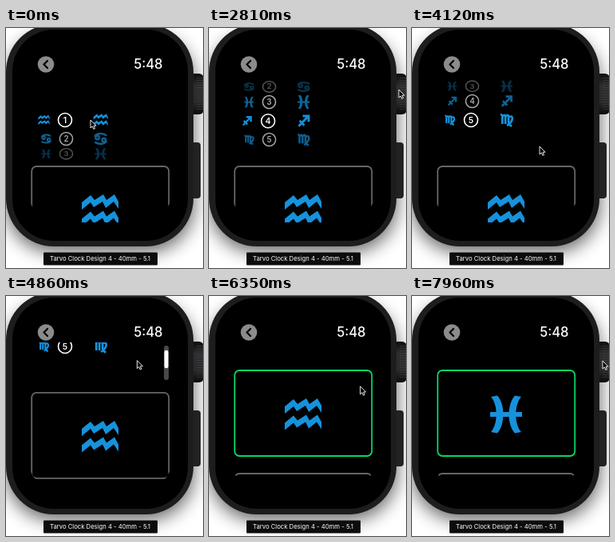
Animation, 247 px wide and 300 px high, one loop 8000 ms. Source, as an HTML page:

```html
<!DOCTYPE html>
<html lang="en">
<head>
<meta charset="utf-8">
<title>Watch pickers</title>
<style>
html, body { margin: 0; width: 100%; height: 100%; overflow: hidden; background: #fff; }
svg { display: block; width: 100%; height: 100%; font-family: Inter, "Liberation Sans", sans-serif; }
.sign { color: #1692dc; }
.line { fill: none; stroke: currentColor; }
.card { fill: none; stroke: #666; stroke-width: 1.8; }
.focus { stroke: #0bd566; }
</style>
</head>
<body>
<svg viewBox="0 0 247 300">
  <defs>
    <filter id="soft" x="-30%" y="-30%" width="160%" height="160%"><feGaussianBlur stdDeviation="11"/></filter>
    <linearGradient id="knob" x2="0" y2="1">
      <stop offset="0" stop-color="#0c0c0c"/><stop offset=".3" stop-color="#2e2e30"/>
      <stop offset=".7" stop-color="#2a2a2c"/><stop offset="1" stop-color="#0a0a0a"/>
    </linearGradient>
    <clipPath id="view"><path d="M28 58H208V205a38 38 0 0 1-38 38H66a38 38 0 0 1-38-38Z"/></clipPath>
    <g id="aquarius">
      <path id="wave" fill="currentColor" d="M-23-10-12-19-7-13 4-20 8-13 18-20 23-11V-2L17-11 7-3 3-11-8-4-12-10-23-1Z"/>
      <use href="#wave" y="20.5"/>
    </g>
    <g id="cancer" class="line" stroke-width="7">
      <path id="claw" d="M-20-7C-14-20 8-20 20-11M-17-4a6 6 0 1 0 12 0a6 6 0 1 0-12 0"/>
      <use href="#claw" transform="rotate(180)"/>
    </g>
    <g id="pisces">
      <path id="arc" fill="currentColor" d="M-19-22-11-23.500C-1-12-1 12-11 23.500L-19 22C-10 12-10-12-19-22Z"/>
      <use href="#arc" transform="scale(-1 1)"/>
      <path class="line" d="M-20 0H20" stroke-width="6"/>
    </g>
    <g id="sagittarius" class="line" stroke-width="7.500">
      <path d="M-16 17 15-15M-3-16H16V3M-13-1 2 14"/>
    </g>
    <g id="virgo" class="line" stroke-width="7">
      <path d="M-20-17Q-14-18-14-10V13M-14-10Q-8-19-4-13V13M-4-10Q2-19 6-13V8Q8 17 17 19M6-8Q18-17 18-3Q15 9 1 18"/>
    </g>
  </defs>

  <rect width="247" height="300" fill="#fff"/>
  <rect y="8" width="236" height="272" rx="60" opacity=".6" filter="url(#soft)"/>
  <rect x="229" y="143" width="15" height="70" rx="4" fill="#222224"/>
  <rect x="230" y="57" width="18" height="51" rx="6" fill="url(#knob)"/>
  <path d="M243 62V103" stroke="#4a4a4c" stroke-width="8" stroke-dasharray=".8 2.200" opacity=".6"/>
  <rect x="0" y="-5" width="235" height="278" rx="60" fill="#1d1d1e"/>
  <rect x="8" y="2" width="220" height="264" rx="52"/>

  <g clip-path="url(#view)">
    <g id="page">
      <g id="wheel"></g>
      <rect id="card" class="card"/>
      <rect class="card" x="32.200" y="302" width="172" height="107" rx="6"/>
      <g id="stack" class="sign"></g>
    </g>
  </g>

  <circle cx="50" cy="45.500" r="10.300" fill="#8b8b8b"/>
  <path d="M52 41 47.500 45.500 52 50" fill="none" stroke="#000" stroke-width="2.300" stroke-linecap="round" stroke-linejoin="round"/>
  <text x="196.500" y="51.200" text-anchor="end" font-size="16.600" font-weight="500" fill="#fff">5:48</text>

  <g id="bar" stroke-linecap="round">
    <path d="M201 65V102" stroke="#484848" stroke-width="6"/>
    <path id="thumb" d="M201 64V81.500" stroke="#fff" stroke-width="5"/>
  </g>

  <rect x="47" y="280.500" width="143" height="16" rx="1" fill="#0c0c0c"/>
  <text x="118" y="291.300" text-anchor="middle" font-size="7.700" fill="#fff">Tarvo Clock Design 4 - 40mm - 5.1</text>
  <path id="cursor" d="M0 0V10L2.300 7.900 3.800 11.300 5.500 10.600 4 7.200H7Z" stroke="#fff" stroke-width=".9"/>
</svg>
<script>
const LOOP = 8000, STEP = 147.4;
const ANGLE = 0.45, RADIUS = 54;
const SIGNS = ['aquarius', 'cancer', 'pisces', 'sagittarius', 'virgo'];
const $ = id => document.getElementById(id);

// Pointer glides: first step, last step, goal.
const GLIDES = [
  [0, 1, 104, 115], [6, 9, 105, 123], [10, 12, 236, 81], [12, 15, 238, 77],
  [24, 28, 160, 148], [30, 34, 165, 71], [38, 41, 163, 130], [42, 46, 239, 81]
];

// Eased progress from 0 to 1 between two steps.
function ramp(k, from, to, power = 1) {
  const f = Math.min(1, Math.max(0, (k - from) / (to - from)));
  return 1 - (1 - f) ** power;
}

function pointer(k) {
  return GLIDES.reduce(([x, y], [from, to, gx, gy]) => {
    const f = ramp(k, from, to, 1.5);
    return [x + (gx - x) * f, y + (gy - y) * f];
  }, [106, 115]);
}

function set(el, attrs) {
  for (const name in attrs) el.setAttribute(name, attrs[name]);
}

const sign = (name, x, size) =>
  `<use class="sign" href="#${name}" transform="translate(${x}) scale(${size})"/>`;

$('wheel').innerHTML = SIGNS.map((name, i) => `<g>
  <g>${sign(name, 47.5, 0.31)}
    <circle cx="74" r="8.500" fill="none" stroke="#fff" stroke-width="1.600"/>
    <text x="74" y="3.700" text-anchor="middle" font-size="10.400" font-weight="600" fill="#fff">${i + 1}</text></g>
  <g>${sign(name, 118.7, 0.39)}</g></g>`).join('');
$('stack').innerHTML = SIGNS.map(name => `<use href="#${name}"/>`).join('');

const rows = [...$('wheel').children], images = [...$('stack').children];

function drawWheel(pos) {
  rows.forEach((row, i) => {
    const d = i - pos, far = Math.abs(d);
    const sx = 1 - 0.05 * Math.min(far, 1);
    const sy = Math.sqrt(Math.max(0, Math.cos(d * ANGLE)));
    set(row, {
      opacity: Math.max(0, 1 - 0.34 * far),
      transform: `translate(0 ${115 + RADIUS * Math.sin(d * ANGLE)})`
    });
    [104, 118.7].forEach((x, j) =>
      set(row.children[j], { transform: `translate(${x}) scale(${sx} ${sy}) translate(${-x})` }));
  });
}

function drawStack(pos) {
  images.forEach((image, i) => {
    const d = i - pos;
    set(image, { opacity: Math.max(0, 1 - Math.abs(d)), transform: `translate(118 ${228 + 50 * d})` });
  });
}

function draw(t) {
  const k = Math.floor(t / STEP + 0.08);
  const scroll = 80 * ramp(k, 30, 37, 1.88);
  const out = k >= 40 ? 2.5 * (1 - ramp(k, 40, 41)) : 0;
  drawWheel(4 * ramp(k, 16, 25, 3.3));
  drawStack(2 * ramp(k, 47, 54));
  set($('page'), { transform: `translate(0 ${-scroll})` });
  set($('card'), { x: 32.2 - out, y: 173 - out, width: 172 + 2 * out, height: 107 + 2 * out, rx: 6 + out });
  $('card').classList.toggle('focus', k >= 40);
  set($('bar'), { opacity: ramp(k, 30, 31) - ramp(k, 38, 40) });
  set($('thumb'), { transform: `translate(0 ${scroll * 0.12})` });
  set($('cursor'), { transform: `translate(${pointer(k)})` });
}

function tick() {
  draw(performance.now() % LOOP);
  requestAnimationFrame(tick);
}
tick();
</script>
</body>
</html>
```
